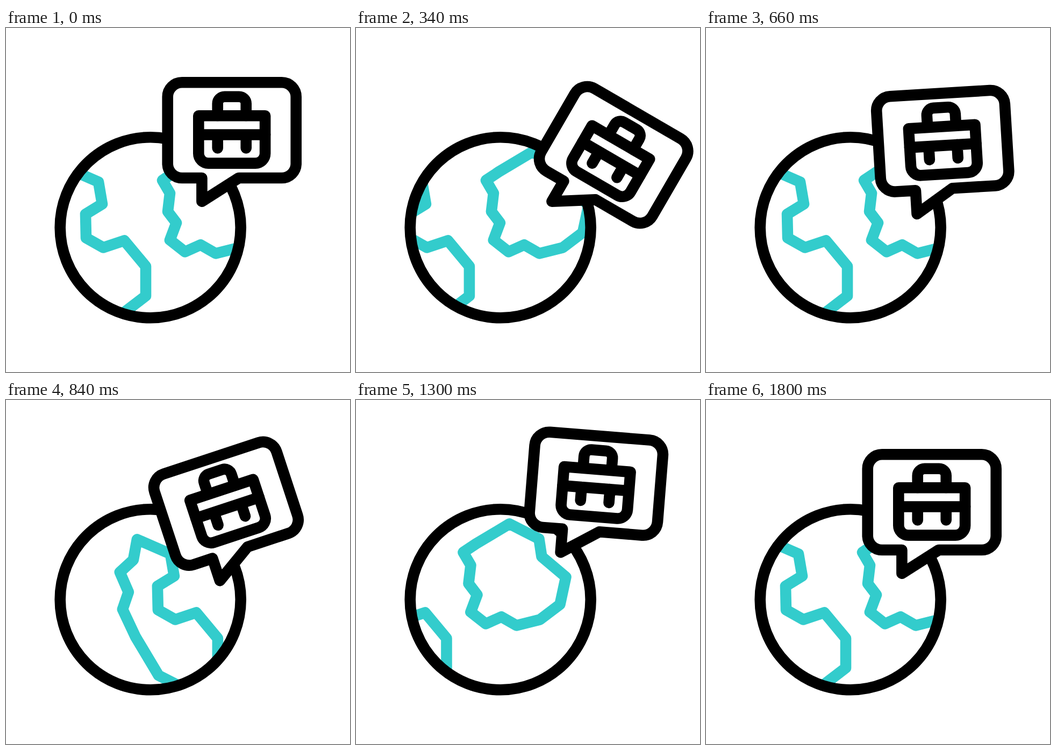
An HTML page for the animation above (2400 ms loop, 640x640 px).

```html
<!DOCTYPE html>
<html lang="en">
<head>
<meta charset="utf-8">
<title>Global job</title>
<style>
  html, body { margin: 0; width: 100%; height: 100%; overflow: hidden; background: #fff; }
  svg { display: block; width: 100vw; height: 100vh; }
  .line { fill: none; stroke: #000; stroke-width: 20.6; stroke-linecap: round; stroke-linejoin: round; }
  .land { stroke: #33cccc; }
  .paper { fill: #fff; }
</style>
</head>
<body>
<svg viewBox="0 0 640 640">
  <defs>
    <clipPath id="disc"><circle cx="268.7" cy="371.3" r="168"/></clipPath>
    <g id="lands">
      <path d="M110 259L172 286 179 327 148 346 149 390 181 408 220 395 260 443V498L205 540 150 512 107 440 83 389 94 357 78 320 103 297Z"/>
      <path d="M377 230L432 258 437 291 482 329 471 380 434 408 390 419 362 403 333 416 305 394 317 362 301 341 305 307 291 283 315 267Z"/>
    </g>
  </defs>
  <g clip-path="url(#disc)">
    <g id="map" class="line land">
      <use href="#lands"/>
      <use id="copy" href="#lands"/>
    </g>
  </g>
  <circle class="line" cx="268.7" cy="371.3" r="168"/>
  <g id="bubble" class="line">
    <path class="paper" d="M364.4 279H327.4a26.7 26.7 0 0 1 -26.7 -26.7V128a26.7 26.7 0 0 1 26.7 -26.7H513a26.7 26.7 0 0 1 26.7 26.7V252.3a26.7 26.7 0 0 1 -26.7 26.7H433L364.4 322.7Z"/>
    <path d="M358.3 163.3H482.1V233.6a18 18 0 0 1 -18 18H376.3a18 18 0 0 1 -18 -18Z"/>
    <path d="M358.3 198.5H482.1M393.7 198.5V223.5M446.7 198.5V223.5"/>
    <path d="M393.7 163V140.8a13 13 0 0 1 13 -13H433.7a13 13 0 0 1 13 13V163"/>
  </g>
</svg>
<script>
  const LOOP = 2400, STEP = 20;
  const TURN = 665, WINDUP = -59;
  const TIP = '364.4 322.7';

  const sine = u => (1 - Math.cos(Math.PI * u)) / 2;
  const sweep = u => 1 - (1 - u ** 1.8) ** 1.7;

  function between(t, t0, t1, v0, v1, ease = sine) {
    const u = Math.min(1, Math.max(0, (t - t0) / (t1 - t0)));
    return v0 + (v1 - v0) * ease(u);
  }

  // Swings from one turning point [time, value] to the next.
  const swing = (...turns) => t => {
    const i = Math.max(1, turns.findIndex(p => p[0] > t));
    const [t0, v0] = turns[i - 1], [t1, v1] = turns[i];
    return between(t, t0, t1, v0, v1);
  };

  // The globe winds up to the left, then makes one full turn to the right.
  const spin = t => t < 465
    ? between(t, 0, 465, 0, WINDUP)
    : between(t, 465, 1480, WINDUP, TURN, sweep);

  const tilt = swing([0, 0], [420, 33], [800, -19], [1180, 9], [1510, -6.2], [1800, 0], [LOOP, 0]);
  const shiftX = swing([340, 0], [780, 34], [1340, 16], [1800, 0], [LOOP, 0]);
  const shiftY = swing([340, 0], [700, 24], [1230, -41], [1760, 0], [LOOP, 0]);

  const map = document.getElementById('map');
  const bubble = document.getElementById('bubble');
  document.getElementById('copy').setAttribute('x', -TURN);

  function draw(t) {
    map.setAttribute('transform', `translate(${spin(t)} 0.4)`);
    bubble.setAttribute('transform',
      `translate(${shiftX(t)} ${shiftY(t)}) rotate(${tilt(t)} ${TIP})`);
  }

  const start = performance.now();
  function tick() {
    const t = (performance.now() - start) % LOOP;
    draw(Math.floor(t / STEP) * STEP);
    requestAnimationFrame(tick);
  }
  tick();
</script>
</body>
</html>
```
